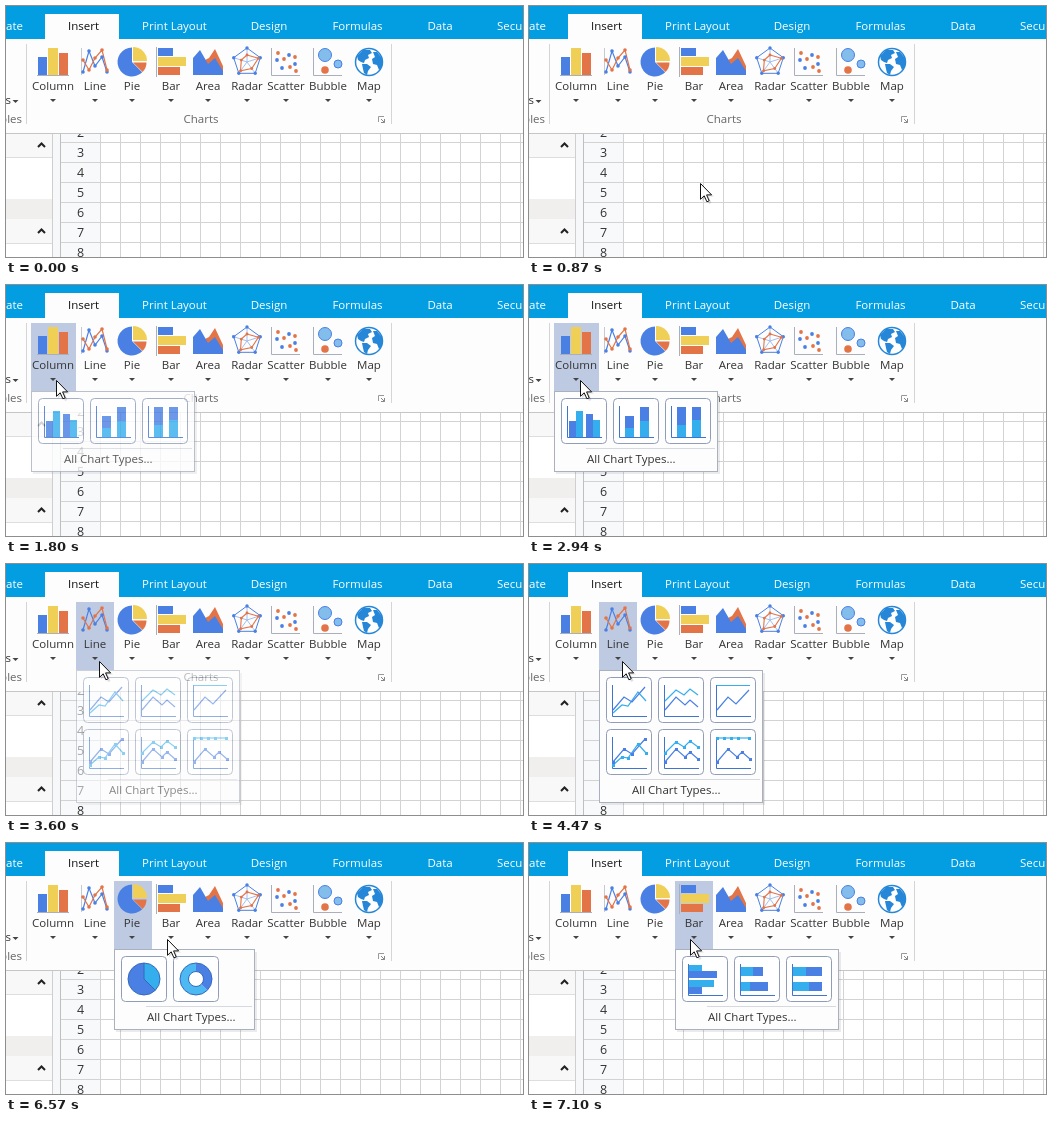
Animation, 517 px wide and 251 px high, one loop 8 s. Source, as an HTML page:

```html
<!DOCTYPE html>
<html lang="en">
<head>
<meta charset="utf-8">
<title>Insert chart ribbon</title>
<style>
html, body { margin: 0; width: 100%; height: 100%; overflow: hidden; background: #fdfdfd; }
svg { display: block; width: 517px; height: 251px; }
text { font: 11.5px "Open Sans", "Noto Sans", sans-serif; fill: #333; }
.mid { text-anchor: middle; }
rect, .crisp { shape-rendering: crispEdges; }
.btn { shape-rendering: auto; fill: #fff; stroke: #8f9db8; }
</style>
</head>
<body>
<svg id="stage" viewBox="0 0 517 251"></svg>
<script>
const LOOP = 8000;
const BLUE = '#4a80e4', CYAN = '#34aeed', YELLOW = '#f0cf57', ORANGE = '#e37448', GREY = '#a9b0bb';

const rect = (x, y, w, h, fill, extra = '') =>
  `<rect x="${x}" y="${y}" width="${w}" height="${h}" fill="${fill}" ${extra}/>`;
const text = (x, y, s, extra = '') => `<text x="${x}" y="${y}" ${extra}>${s}</text>`;
const poly = (pts, stroke, w = 1.2) =>
  `<polyline points="${pts}" fill="none" stroke="${stroke}" stroke-width="${w}"/>`;
const shape = (pts, fill) => `<polygon points="${pts}" fill="${fill}"/>`;
const dot = (x, y, r, fill, extra = '') => `<circle cx="${x}" cy="${y}" r="${r}" fill="${fill}" ${extra}/>`;
const move = (x, y, s) => `<g transform="translate(${x} ${y})">${s}</g>`;
const pairs = pts => pts.split(' ').map(p => p.split(',').map(Number));
const dots = (pts, r, fill) => pairs(pts).map(([x, y]) => dot(x, y, r, fill)).join('');
const squares = (pts, fill) => pairs(pts).map(([x, y]) => rect(x - 1.5, y - 1.5, 3, 3, fill)).join('');
const arrow = (x, y) => shape(`${x - 3},${y} ${x + 3},${y} ${x},${y + 3}`, '#444');

// Angles run clockwise in degrees from twelve o'clock.
function sector(cx, cy, r, from, to, fill) {
  const at = a => {
    const k = (a - 90) * Math.PI / 180;
    return `${(cx + r * Math.cos(k)).toFixed(2)} ${(cy + r * Math.sin(k)).toFixed(2)}`;
  };
  return `<path d="M${cx} ${cy}L${at(from)}A${r} ${r} 0 ${to - from > 180 ? 1 : 0} 1 ${at(to)}Z" fill="${fill}"/>`;
}

function ring(r, cx = 0, cy = 0) {
  return Array.from({ length: 5 }, (_, i) => {
    const a = i * Math.PI * 0.4 - Math.PI / 2;
    const k = Array.isArray(r) ? r[i] : r;
    return `${(cx + k * Math.cos(a)).toFixed(1)},${(cy + k * Math.sin(a)).toFixed(1)}`;
  });
}

// Ribbon icons, centred on 0,0.
function radarIcon() {
  const outer = ring(14), inner = ring([7, 12, 8, 11, 6]);
  return poly([...outer, outer[0]].join(' '), BLUE, 1) +
    outer.map(p => poly(`0,0 ${p}`, '#8fb0ea', 0.8)).join('') +
    poly([...inner, inner[0]].join(' '), ORANGE, 1.1) +
    dots(outer.join(' '), 1.7, BLUE) + dots(inner.join(' '), 1.4, ORANGE);
}
const lineA = '-12,10 -6,-11 0,4 7,-5 12,10', lineB = '-12,-2 -6,8 0,-4 7,-12 12,8';
const axes = poly('-14.5,-14 -14.5,13.5 14,13.5', GREY, 1);
const icons = {
  column: rect(-15, -5, 9, 18, BLUE) + rect(-5, -14, 10, 27, YELLOW) + rect(6, -9, 9, 22, ORANGE) +
    rect(-16, 13, 32, 1, GREY),
  line: poly('-13.5,-14 -13.5,13', '#c5cad2', 1) + poly(lineA, BLUE) + poly(lineB, ORANGE) +
    dots(lineA, 1.8, BLUE) + dots(lineB, 1.8, ORANGE),
  pie: sector(0, 0, 14.5, 135, 360, BLUE) + sector(1, -1, 14, 0, 90, YELLOW) + sector(1, 0.5, 13.5, 90, 135, ORANGE),
  bar: rect(-15, -15, 1, 30, GREY) + rect(-13, -14, 15, 8, BLUE) + rect(-13, -5, 28, 9, YELLOW) +
    rect(-13, 5, 22, 8, ORANGE),
  area: shape('-15,13 -15,6 -7,0 1,-4 7,-13 15,4 15,13', ORANGE) +
    shape('-15,13 -15,-4 -8,-12 0,2 7,-4 15,9 15,13', BLUE),
  radar: radarIcon(),
  scatter: axes + dots('-9,-2 -4,6 3,-7 9,2', 1.9, BLUE) + dots('-8,-9 -2,-3 4,5 9,-5 10,9', 1.9, ORANGE),
  bubble: axes + dot(-3, -7, 6.5, '#82bdec', `stroke="${BLUE}"`) + dot(-3, 8, 3.8, ORANGE) +
    dot(10, 2, 4, '#82bdec', `stroke="${BLUE}"`),
  map: dot(0, 0, 13.5, '#fff', 'stroke="#2687d8" stroke-width="1.5"') +
    shape('-12,-6 -6,-12 1,-12 3,-9 -1,-7 0,-4 -4,-2 -5,1 -8,0 -11,-2', '#2687d8') +
    shape('-7,2 -2,2 2,5 -1,9 -2,13 -5,11 -6,7', '#2687d8') +
    shape('4,-10 8,-10 13,-4 13,5 10,8 8,3 4,2 3,-3 6,-5', '#2687d8')
};

const ribbon = [
  ['column', 'Column', 47], ['line', 'Line', 89], ['pie', 'Pie', 126], ['bar', 'Bar', 165],
  ['area', 'Area', 202], ['radar', 'Radar', 241], ['scatter', 'Scatter', 280],
  ['bubble', 'Bubble', 322], ['map', 'Map', 363]
];

// Gallery thumbnails in a 46 by 46 button.
const thumbAxis = poly('6.5,8 6.5,39.5 41,39.5', '#3f74cf', 1);
const vbar = (x, top, mid, w = 9) => rect(x, top, w, mid - top, BLUE) + rect(x, mid, w, 39 - mid, CYAN);
const hbar = (y, mid, end) => rect(7, y, mid - 7, 9, CYAN) + rect(mid, y, end - mid, 9, BLUE);
const up = '7,33 18,20 26,25 39,10', cross = '7,36 16,28 22,29 32,15 40,24';
const low = '7,33 18,20 27,28 32,23 40,30', high = '7,24 18,13 26,18 32,12 40,18';
const flat = '7,9 14,9 21,9 28,9 39,9', single = '7,33 18,20 26,27 39,13';
const pair = (a, b, marks) => thumbAxis + poly(b, CYAN) + poly(a, BLUE) +
  (marks ? squares(b, CYAN) + squares(a, BLUE) : '');
const rim = 'stroke="#3568bd"';

const popups = [
  { x: 25, w: 164, hot: [25, 45], open: 1640, full: 1840, close: 3470, thumbs: [
    thumbAxis + rect(8, 23, 7, 16, BLUE) + rect(15, 13, 7, 26, CYAN) + rect(25, 16, 7, 23, BLUE) + rect(32, 22, 7, 17, CYAN),
    thumbAxis + vbar(12, 18, 30) + vbar(27, 9, 23),
    thumbAxis + vbar(12, 9, 27) + vbar(27, 9, 22)] },
  { x: 70, w: 164, hot: [70, 38], open: 3470, full: 3700, close: 5100, thumbs: [
    pair(up, cross), pair(low, high), pair(single, '7,8.5 40,8.5'),
    pair(up, cross, 1), pair(low, high, 1), pair(low, flat, 1)] },
  { x: 108, w: 141, hot: [108, 38], open: 5100, full: 5370, close: 6870, thumbs: [
    sector(23, 23, 16, 135, 360, BLUE) + sector(23, 23, 16, 0, 135, CYAN) +
      dot(23, 23, 16, 'none', rim) + poly('23,7 23,23 34.3,34.3', '#3568bd', 1),
    sector(23, 23, 16, 135, 360, '#4db9f2') + sector(23, 23, 16, 0, 135, BLUE) +
      dot(23, 23, 16, 'none', rim) + dot(23, 23, 7.5, '#fff', rim)] },
  { x: 146, w: 164, hot: [146, 38], open: 6870, full: 7100, close: LOOP, thumbs: [
    thumbAxis + rect(7, 9, 13, 6, CYAN) + rect(7, 15, 28, 7, BLUE) + rect(7, 24, 25, 7, CYAN) + rect(7, 31, 13, 7, BLUE),
    thumbAxis + hbar(11, 19, 29) + hbar(26, 16, 34),
    thumbAxis + hbar(11, 20, 36) + hbar(26, 23, 36)] }
];

function popup({ x, w, thumbs }, i) {
  const rows = Math.ceil(thumbs.length / 3), h = 28 + rows * 52;
  const cells = thumbs.map((s, n) => move(x + 7 + n % 3 * 52, 113 + Math.floor(n / 3) * 52,
    '<rect class="btn" x=".5" y=".5" width="45" height="45" rx="4"/>' + s)).join('');
  return `<g id="pop${i}">` + rect(x + 2, 109, w, h, '#000', 'opacity=".08"') +
    rect(x + 0.5, 106.5, w - 1, h, '#fdfdfd', 'stroke="#a9b1bf"') + cells +
    rect(x + 32, 111 + rows * 52, w - 35, 1, '#d6dae0') +
    text(x + 33, 126 + rows * 52, 'All Chart Types...') + '</g>';
}

function sheet() {
  let s = rect(0, 127, 517, 124, '#fff') + rect(55, 128, 39, 123, '#f8f9fb');
  for (let y = 136; y < 251; y += 20) s += rect(55, y, 462, 1, '#d3d3d3');
  for (let x = 94; x < 517; x += 20) s += rect(x, 128, 1, 123, '#d3d3d3');
  s += '<svg y="128" width="100" height="123" viewBox="0 128 100 123">';
  for (let n = 2; n < 9; n++) s += text(74.5, 91 + n * 20, n, 'class="mid" style="font-size:12.5px"');
  return s + '</svg>';
}

function sidePanel() {
  const chevron = y => poly(`32,${y + 2} 35.5,${y - 1.5} 39,${y + 2}`, '#222', 2);
  return rect(0, 128, 46, 24, '#f8f8f8') + rect(0, 151, 46, 1, '#dedede') +
    rect(0, 193, 46, 20, '#f1eeee') + rect(0, 213, 46, 24, '#f8f8f8') + rect(0, 237, 46, 1, '#dedede') +
    rect(46, 128, 8, 123, '#f7f8f9') + rect(46, 128, 1, 123, '#cfcfcf') + rect(54, 128, 1, 123, '#bfbfbf') +
    chevron(139) + chevron(225);
}

function header() {
  const tabs = [[168.5, 'Print Layout'], [263, 'Design'], [351.5, 'Formulas'], [434, 'Data']];
  return rect(0, 0, 517, 33, '#039de1') + rect(39, 8, 74, 26, '#fdfdfd') +
    text(77.5, 24, 'Insert', 'class="mid" style="fill:#111"') +
    tabs.map(([x, s]) => text(x, 24, s, 'class="mid" style="fill:#fff"')).join('') +
    text(17, 24, 'Template', 'text-anchor="end" style="fill:#fff"') +
    text(491, 24, 'Security', 'style="fill:#fff"');
}

function ribbonBody() {
  return rect(20, 38, 1, 80, '#d5d5d5') + rect(385, 38, 1, 80, '#d5d5d5') +
    text(5, 98, 's', 'text-anchor="end"') + arrow(9.5, 94) +
    text(16, 117, 'Tables', 'text-anchor="end" style="fill:#666"') +
    text(195, 117, 'Charts', 'class="mid" style="fill:#666"') +
    poly('372.5,116 372.5,110.5 378,110.5', '#999', 1) + poly('375,113 378.5,116.5 378.5,113', '#888', 1) +
    poly('378.5,116.5 375,116.5', '#888', 1) +
    ribbon.map(([id, label, x]) => move(x, 56, icons[id]) + text(x, 84, label, 'class="mid"') + arrow(x, 93)).join('');
}

const tooltip = '<g id="tip">' + rect(27, 130, 200, 55, '#000', 'opacity=".06"') +
  rect(25.5, 128.5, 199, 54, '#fff', 'stroke="#c4c4c4"') +
  text(33, 149, 'Column', 'style="font-weight:bold;font-size:11px;fill:#666"') +
  text(33, 173, 'Insert a Column chart.', 'style="fill:#666"') + '</g>';

const pointer = '<g id="cursor"><path d="M2 2V18L6 14.5 9 21 11.5 20 8.8 13.5H14Z" fill="#000" opacity=".12"/>' +
  '<path d="M.5 .5V16.3L4.2 12.8 6.9 18.8 9.2 17.8 6.6 11.9H11.6Z" fill="#fff" stroke="#111"/></g>';

const stage = document.getElementById('stage');
stage.innerHTML = sheet() + sidePanel() + rect(0, 33, 517, 94, '#fdfdfd') + rect(0, 127, 517, 1, '#c6c6c6') +
  header() + '<rect id="hot" y="38" height="68"/>' + ribbonBody() + tooltip +
  popups.map(popup).join('') + pointer;

const el = id => document.getElementById(id);
const hot = el('hot'), tip = el('tip'), cursor = el('cursor');
const layers = popups.map((_, i) => el('pop' + i));

// time, x, y
const path = [
  [500, 275, 234], [1300, 42, 106], [1340, 45, 103], [1440, 50, 95], [2940, 51, 95], [3300, 89, 97],
  [3470, 89, 97], [3580, 93, 97], [4470, 93, 97], [4940, 125, 96], [6170, 125, 96], [6570, 161, 96]
];
const clamp = v => Math.max(0, Math.min(1, v));
const ramp = (t, a, b) => clamp((t - a) / (b - a));
const ease = k => k * k * (3 - 2 * k);

function cursorAt(t) {
  const i = path.findIndex(p => p[0] > t);
  if (i < 0) return path[path.length - 1].slice(1);
  const [a, b] = [path[Math.max(0, i - 1)], path[i]];
  const k = ease(ramp(t, a[0], b[0]));
  return [a[1] + (b[1] - a[1]) * k, a[2] + (b[2] - a[2]) * k];
}

function draw(t) {
  const [x, y] = cursorAt(t).map(Math.round);
  cursor.setAttribute('transform', `translate(${x} ${y})`);
  cursor.style.display = t < 500 ? 'none' : '';
  tip.style.opacity = t < 1640 ? ramp(t, 1440, 1540) : 0;

  const active = popups.findIndex(p => t >= p.open && t < p.close);
  layers.forEach((g, i) => {
    g.style.opacity = i === active ? ramp(t, popups[i].open, popups[i].full) : 0;
  });
  const [hx, hw] = popups[Math.max(0, active)].hot;
  hot.setAttribute('x', hx);
  hot.setAttribute('width', hw);
  hot.setAttribute('fill', active < 0 ? '#e4eaf4' : '#bdcae1');
  hot.style.display = t < 1340 ? 'none' : '';
}

const start = performance.now();
function tick() {
  draw((performance.now() - start) % LOOP);
  requestAnimationFrame(tick);
}
tick();
</script>
</body>
</html>
```
